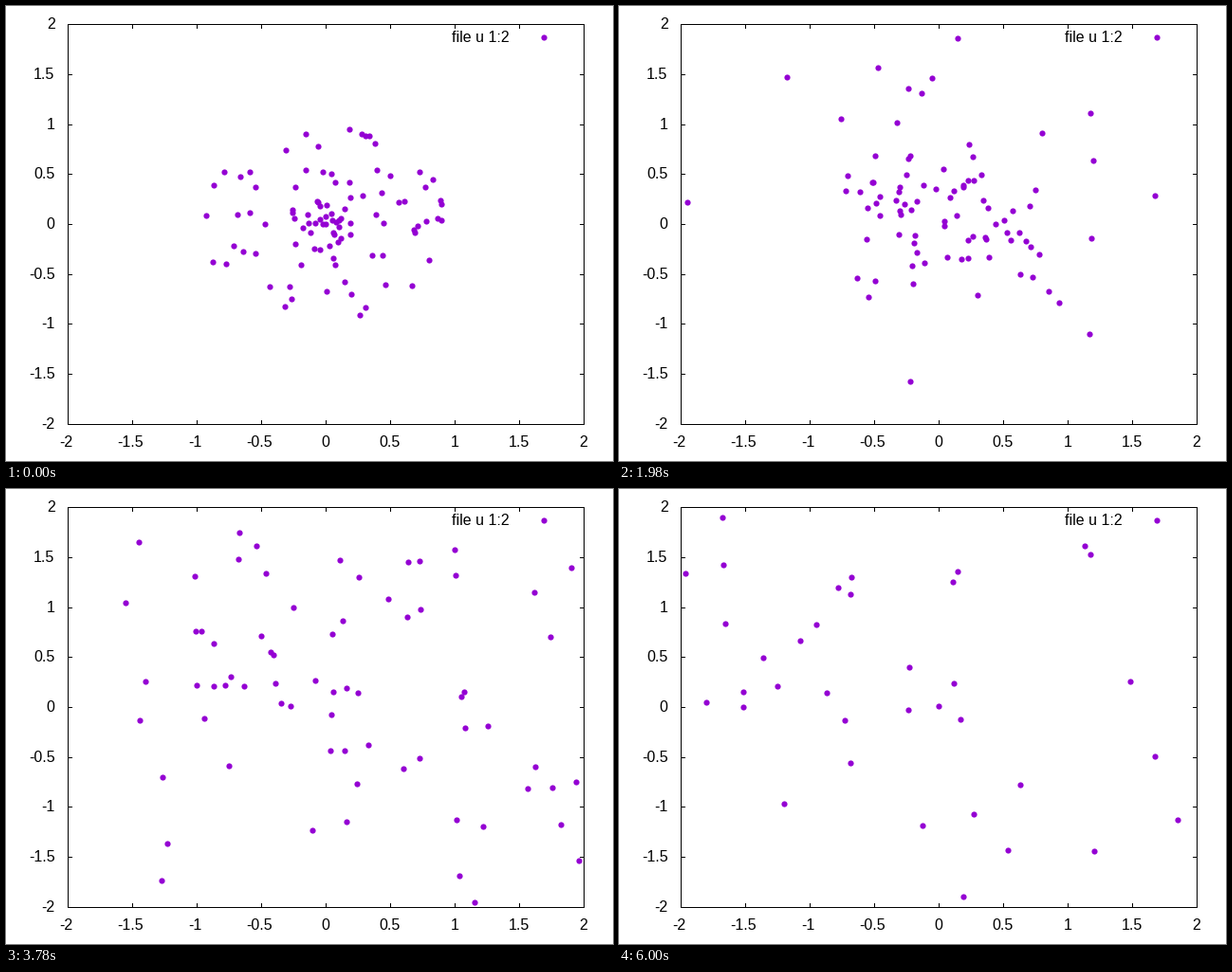
These frames come from a looping animation (640x480 px, 6.06 s). A matplotlib script:

```python
import numpy as np
import matplotlib.pyplot as plt
from matplotlib.animation import FuncAnimation

W, H, DPI = 640, 480, 100
PX = 72 / DPI                       # one pixel in points
FRAMES, STEP = 101, 60
LEFT, RIGHT, TOP, BOTTOM = 65, 609, 19, 441
PURPLE = "#9400d3"

N = 98
BOUNCE, JOIN = 18, 55               # deepest collapse, start of free flight

plt.rcParams["font.family"] = "Liberation Sans"
plt.rcParams["font.size"] = 16 * PX

rng = np.random.default_rng(12)


def polar(r, a):
    return np.column_stack([r * np.cos(a), r * np.sin(a)])


def angles():
    return rng.uniform(0, 2 * np.pi, N)


# A resting disc, dense in the middle, that collapses and flies apart
start = polar(rng.random(N), angles())
speed = .033 * np.exp(.85 * rng.standard_normal(N))
vel = polar(speed, angles()) + (-.001, .002)
join = vel * (JOIN - BOUNCE) + rng.normal((0, .1), .22, (N, 2))
phase = angles()


def cloud(t):
    if t < JOIN:                    # Hermite curve from rest into free flight
        u = t / JOIN
        s = u * u * (3 - 2 * u)
        p = start * (1 - s) + join * s + vel * JOIN * u * u * (u - 1)
    else:
        p = join + vel * (t - JOIN)
    return p + polar(.1, phase + .1 * t) - polar(.1, phase)


def to_px(p):
    x = LEFT + (p[:, 0] + 2) * (RIGHT - LEFT) / 4
    y = BOTTOM - (p[:, 1] + 2) * (BOTTOM - TOP) / 4
    return np.round(x), np.round(y)


fig = plt.figure(figsize=(W / DPI, H / DPI), dpi=DPI, facecolor="white")
ax = fig.add_axes([0, 0, 1, 1])
ax.set(xlim=(0, W), ylim=(H, 0))
ax.axis("off")


def line(xs, ys):
    """Line through the centres of whole pixels."""
    ax.plot(np.add(xs, .5), np.add(ys, .5), color="black", lw=PX, snap=False)


def dots(xs, ys):
    return ax.plot(xs, ys, "o", ms=6.2 * PX, mew=0, color=PURPLE,
                   antialiased=False, zorder=3)[0]


line([LEFT, RIGHT, RIGHT, LEFT, LEFT], [TOP, TOP, BOTTOM, BOTTOM, TOP])
for i in range(9):
    label = f"{i / 2 - 2:g}"
    x = LEFT + round((RIGHT - LEFT) * i / 8)
    y = BOTTOM - round((BOTTOM - TOP) * i / 8)
    for edge, d in ((BOTTOM, -4), (TOP, 4)):
        line([x, x], [edge, edge + d])
    for edge, d in ((LEFT, 4), (RIGHT, -4)):
        line([edge, edge + d], [y, y])
    shift = 1.5 if label[0] == "-" else 0
    ax.text(x - shift, 465, label, ha="center", va="baseline")
    ax.text(51.5, y + 5, label, ha="right", va="baseline")

ax.text(531, 38, "file u 1:2", ha="right", va="baseline")
dots([567], [33])
swarm = dots([], [])


def draw(t):
    p = cloud(t)
    swarm.set_data(*to_px(p[np.abs(p).max(axis=1) <= 2]))
    return [swarm]


anim = FuncAnimation(fig, draw, frames=FRAMES, interval=STEP,
                     init_func=lambda: draw(0), repeat=True, repeat_delay=0)
plt.show()
```
